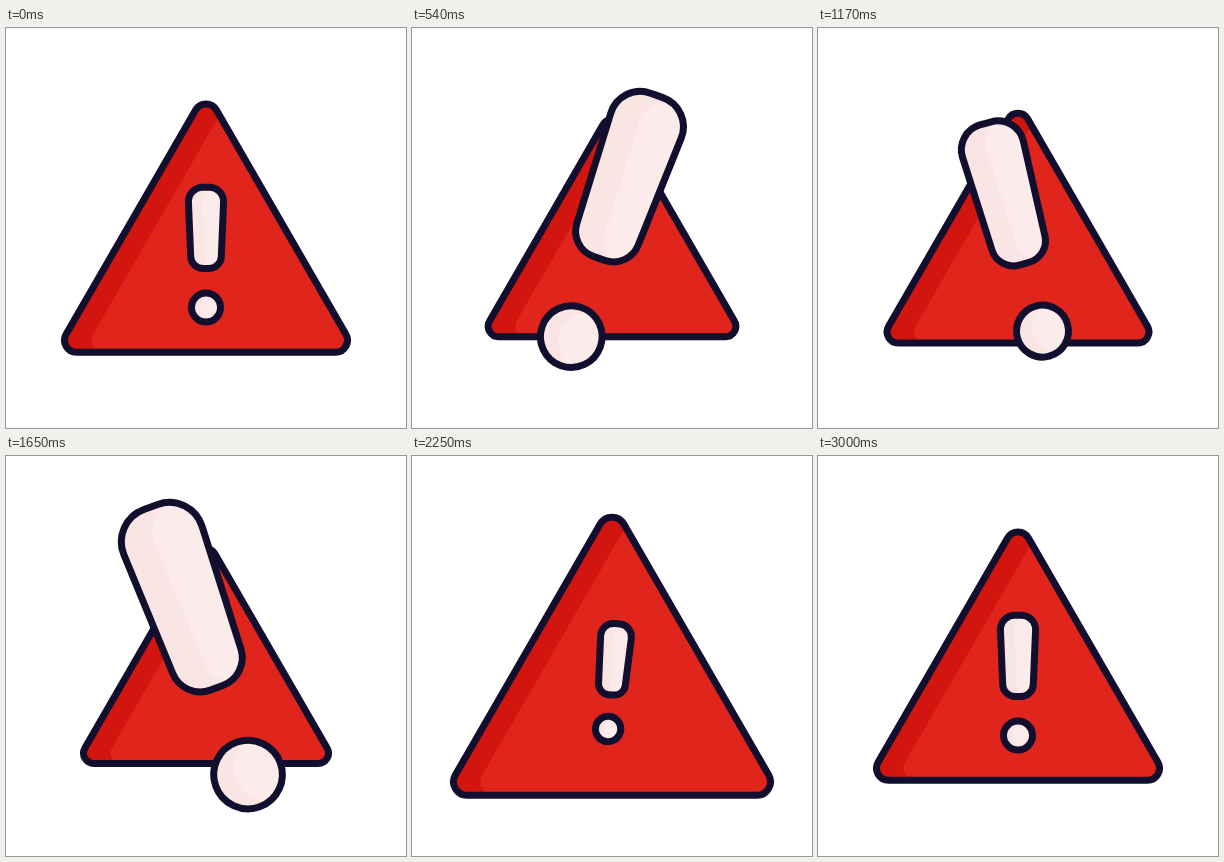
Animation, 400 px wide and 400 px high, one loop 3030 ms. Source, as an HTML page with a canvas:

```html
<!DOCTYPE html>
<html lang="en">
<head>
<meta charset="utf-8">
<title>Warning sign</title>
<style>
  html, body { margin: 0; width: 100%; height: 100%; overflow: hidden; background: #fff; }
  canvas { display: block; width: 400px; height: 400px; }
</style>
</head>
<body>
<canvas width="400" height="400"></canvas>
<script>
const ctx = document.querySelector('canvas').getContext('2d');
const LOOP = 3030;

// Each motion is a sum of eased steps: lean right, relax, lean left, dip, rest
function pose(t) {
  const step = (from, to) => {
    const u = Math.min(1, Math.max(0, (t - from) / (to - from)));
    return u * u * (3 - 2 * u);
  };
  const size = 1 - 0.145 * step(0, 360) + 0.095 * step(360, 975) - 0.09 * step(975, 1540)
    + 0.262 * step(1600, 2200) - 0.122 * step(2210, 2730);
  const scale = 1 + 1.39 * step(0, 360) - 1.005 * step(360, 900) + 1.025 * step(900, 1530)
    - 1.535 * step(1590, 2200) + 0.125 * step(2210, 2730);
  const angle = 19.5 * step(0, 360) - 39.5 * step(560, 1340)
    + 25 * step(1640, 2200) - 5 * step(2210, 2730);
  const drift = step(100, 780) - step(780, 1170);
  return {
    size, scale, angle,
    x: 200 - 5.3 * drift,
    y: 245.5 - 18 * Math.max(scale, 1) - 4 * drift
  };
}

// Closed symmetric polygon from its right-hand corners [x, y, radius], top to bottom
function rounded(right) {
  const left = right.filter(p => p[0] > 0).map(([x, y, r]) => [-x, y, r]).reverse();
  const points = [...right, ...left];
  const path = new Path2D(), first = points[0], last = points[points.length - 1];
  path.moveTo((last[0] + first[0]) / 2, (last[1] + first[1]) / 2);
  points.forEach(([x, y, r], i) => {
    const next = points[(i + 1) % points.length];
    path.arcTo(x, y, next[0], next[1], r);
  });
  path.closePath();
  return path;
}

// Triangle is centred on the stage, bar and dot on the pivot of the mark
const triangle = rounded([[0, -136, 12], [150.3, 124.3, 12]]);
const bar = rounded([[18.2, -68.3, 14.5], [14.8, 13, 12.5]]);
const dot = new Path2D();
dot.arc(0, 52, 14.5, 0, Math.PI * 2);

function placed(shape, matrix) {
  const path = new Path2D();
  path.addPath(shape, matrix);
  return path;
}

// Dark side on the left, outline of constant width
function draw(shape, matrix, shift, dark, light) {
  const path = placed(shape, matrix);
  ctx.fillStyle = dark;
  ctx.fill(path);
  ctx.save();
  ctx.clip(path);
  ctx.fillStyle = light;
  ctx.fill(placed(shape, matrix.translate(shift, 0)));
  ctx.restore();
  ctx.stroke(path);
}

function frame(now) {
  const { size, scale, angle, x, y } = pose(now % LOOP);
  ctx.fillStyle = '#fff';
  ctx.fillRect(0, 0, 400, 400);
  ctx.lineWidth = 7;
  ctx.strokeStyle = '#120f2e';
  const sign = new DOMMatrix().translate(200, 200).scale(size);
  draw(triangle, sign, 27 / size, '#d2160f', '#e0251c');
  const mark = new DOMMatrix().translate(x, y).rotate(angle).scale(scale);
  draw(bar, mark, 14, '#f9e5e3', '#fcebeb');
  draw(dot, mark, 9, '#f9e5e3', '#fcebeb');
}

const start = performance.now();
(function tick() {
  frame(performance.now() - start);
  requestAnimationFrame(tick);
})();
</script>
</body>
</html>
```
